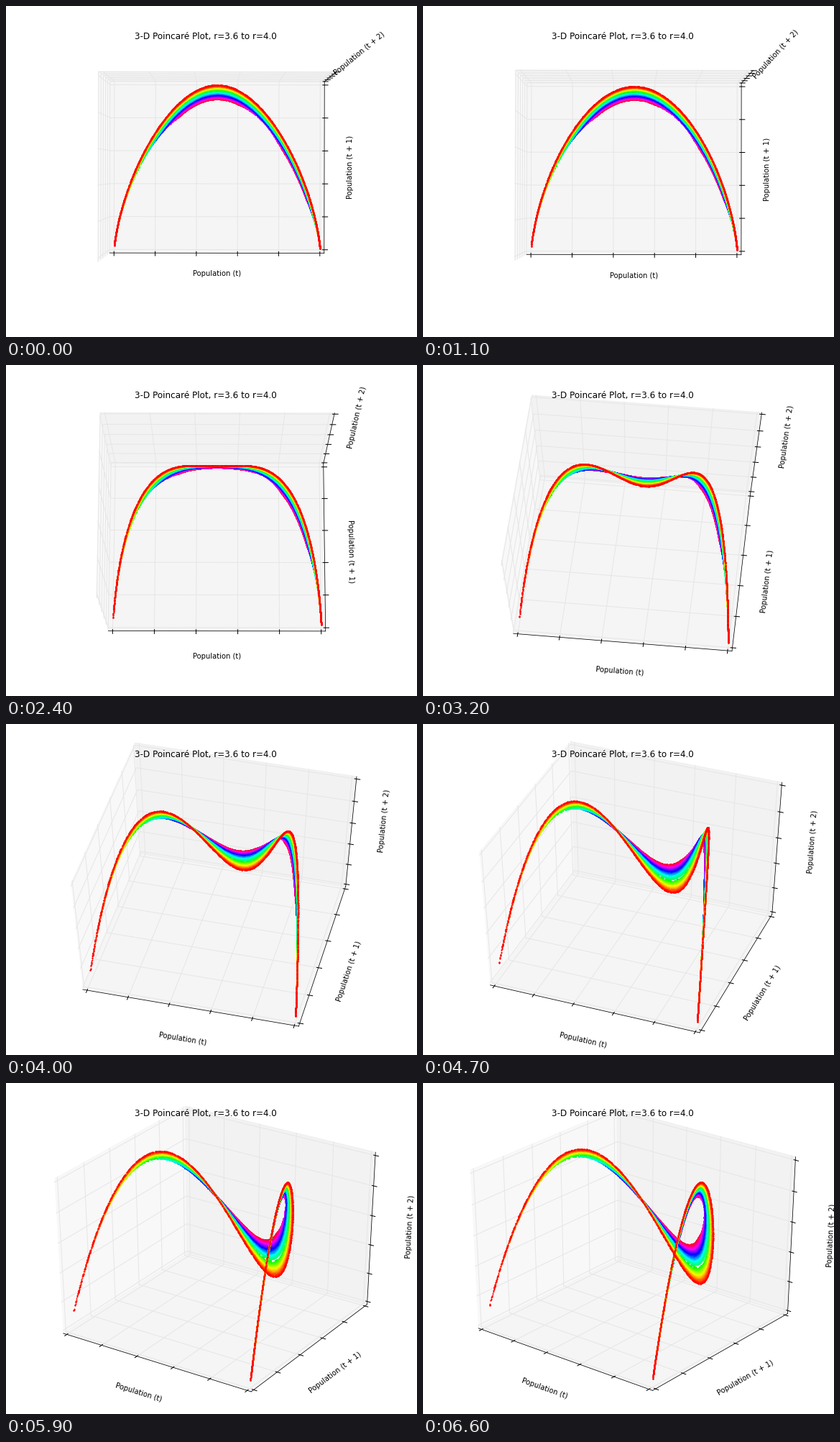
A matplotlib script that plays this animation: 572x460 px, repeating every 7.5 s.

```python
import numpy as np
import matplotlib.pyplot as plt
from matplotlib.animation import FuncAnimation
from matplotlib.collections import LineCollection
from matplotlib.patches import Polygon

W, H, DPI = 572, 460, 64
PX = 72 / DPI                      # one pixel in points

# camera and screen mapping
DIST = 10
CX, CY = 293.8, 223.9
SX, SY = 3014, 2408

# box geometry in data units
LO, HI = -1 / 48, 1 + 1 / 48
BACK, FRONT = (LO, HI, LO), (HI, LO, HI)
LABEL_PAD = 0.134
TICKS = np.linspace(0, 1, 6)

# camera path: change per 100 ms step
DROP = np.repeat([0.5, 1.0, 1.5, 1.0, 0.5, 0.2], [3, 14, 24, 4, 9, 3])
TURN = np.repeat([0.0, 1.0, 0.5], [17, 37, 3])
ELEV = 89.9 - np.append(0, np.cumsum(DROP))
AZIM = 270.1 + np.append(0, np.cumsum(TURN))
FRAMES, INTERVAL, HOLD = 75, 100, 9


def logistic_points(rates, gens=1000, skip=100):
    """Triples (x[t], x[t+1], x[t+2]) of the logistic map for every rate."""
    x = np.full(len(rates), 0.5)
    orbit = []
    for _ in range(skip + gens + 2):
        orbit.append(x)
        x = rates * x * (1 - x)
    orbit = np.array(orbit[skip:]).T
    return np.stack([orbit[:, :-2], orbit[:, 1:-1], orbit[:, 2:]], axis=-1)


def project(points, elev, azim):
    """Perspective view of data points in pixels, y pointing down."""
    e, a = np.radians([elev, azim])
    right = np.array([-np.sin(a), np.cos(a), 0])
    up = np.array([-np.cos(a) * np.sin(e), -np.sin(a) * np.sin(e), np.cos(e)])
    eye = np.array([np.cos(a) * np.cos(e), np.sin(a) * np.cos(e), np.sin(e)])
    q = np.asarray(points) - 0.5
    depth = DIST - q @ eye
    return np.stack([CX + SX * (q @ right) / depth,
                     CY - SY * (q @ up) / depth], axis=-1)


def with_value(point, index, value):
    p = np.array(point, float)
    p[index] = value
    return p


def grid_lines():
    lines = []
    for i in range(3):
        j, k = [n for n in range(3) if n != i]
        for t in TICKS:
            mid = with_value(BACK, i, t)
            lines.append([with_value(mid, j, FRONT[j]), mid,
                          with_value(mid, k, FRONT[k])])
    return np.array(lines)


# each axis: a point on its edge, and the direction of its ticks
EDGES = [((0, LO, LO), (0, -1, 0)),
         ((HI, 0, LO), (1, 0, 0)),
         ((HI, HI, 0), (1, 0, 0))]


def axis_parts():
    spines, ticks, anchors = [], [], []
    for i, (edge, out) in enumerate(EDGES):
        spines.append([with_value(edge, i, LO), with_value(edge, i, HI)])
        out = np.array(out) / 12
        for t in TICKS:
            p = with_value(edge, i, t)
            ticks.append([p - 0.1 * out, p + 0.2 * out])
        mid = with_value(edge, i, 0.5)
        anchors.append(mid + LABEL_PAD * np.sign(mid - 0.5))
    return np.array(spines), np.array(ticks), np.array(anchors)


def text_angle(start, end):
    dx, dy = end - start
    angle = np.degrees(np.arctan2(-dy, dx)) % 180
    return angle - 180 if angle > 90 else angle


PANES = np.array([
    [(LO, LO, LO), (LO, HI, LO), (LO, HI, HI), (LO, LO, HI)],
    [(LO, HI, LO), (HI, HI, LO), (HI, HI, HI), (LO, HI, HI)],
    [(LO, LO, LO), (HI, LO, LO), (HI, HI, LO), (LO, HI, LO)]])
PANE_GREYS = ["0.95", "0.9", "0.925"]
GRID = grid_lines()
SPINES, TICK_MARKS, ANCHORS = axis_parts()
RATES = 3.6 + 0.008 * np.arange(50)
POINTS = logistic_points(RATES)
COLORS = plt.get_cmap("hsv")(np.linspace(1, 0, len(RATES)))

fig = plt.figure(figsize=(W / DPI, H / DPI), dpi=DPI, facecolor="white")
ax = fig.add_axes([0, 0, 1, 1])
ax.set_xlim(0, W)
ax.set_ylim(H, 0)
ax.axis("off")

panes = [ax.add_patch(Polygon(np.zeros((4, 2)), closed=False, facecolor=g,
                              edgecolor=g, alpha=0.5, linewidth=PX, zorder=1))
         for g in PANE_GREYS]


def add_lines(color, width, zorder):
    lines = LineCollection([], colors=color, linewidths=width * PX,
                           capstyle="projecting", zorder=zorder)
    return ax.add_collection(lines, autolim=False)


grid = add_lines("0.9", 1, 2)
spines = add_lines("black", 0.75, 3)
tick_marks = add_lines("black", 1, 3)
labels = [ax.text(0, 0, f"Population ({t})", fontsize=10 * PX,
                  ha="center", va="center", zorder=3)
          for t in ("t", "t + 1", "t + 2")]
clouds = [ax.plot([], [], "o", color=c, markersize=1.9 * PX,
                  markeredgewidth=0, zorder=4)[0] for c in COLORS]
ax.text(278, 46, "3-D Poincaré Plot, r=3.6 to r=4.0", fontsize=12 * PX,
        ha="center", va="baseline", zorder=5)


def update(frame):
    step = min(max(frame - HOLD, 0), len(DROP))
    view = ELEV[step], AZIM[step]
    for pane, xy in zip(panes, project(PANES, *view)):
        pane.set_xy(xy)
    grid.set_segments(project(GRID, *view))
    ends = project(SPINES, *view)
    spines.set_segments(ends)
    tick_marks.set_segments(project(TICK_MARKS, *view))
    for label, pos, (a, b) in zip(labels, project(ANCHORS, *view), ends):
        label.set_position(pos)
        label.set_rotation(text_angle(a, b))
    for cloud, xy in zip(clouds, project(POINTS, *view)):
        cloud.set_data(xy[:, 0], xy[:, 1])
    return []


anim = FuncAnimation(fig, update, frames=FRAMES, interval=INTERVAL,
                     init_func=lambda: update(0), repeat=True,
                     repeat_delay=0, blit=False)
plt.show()
```
